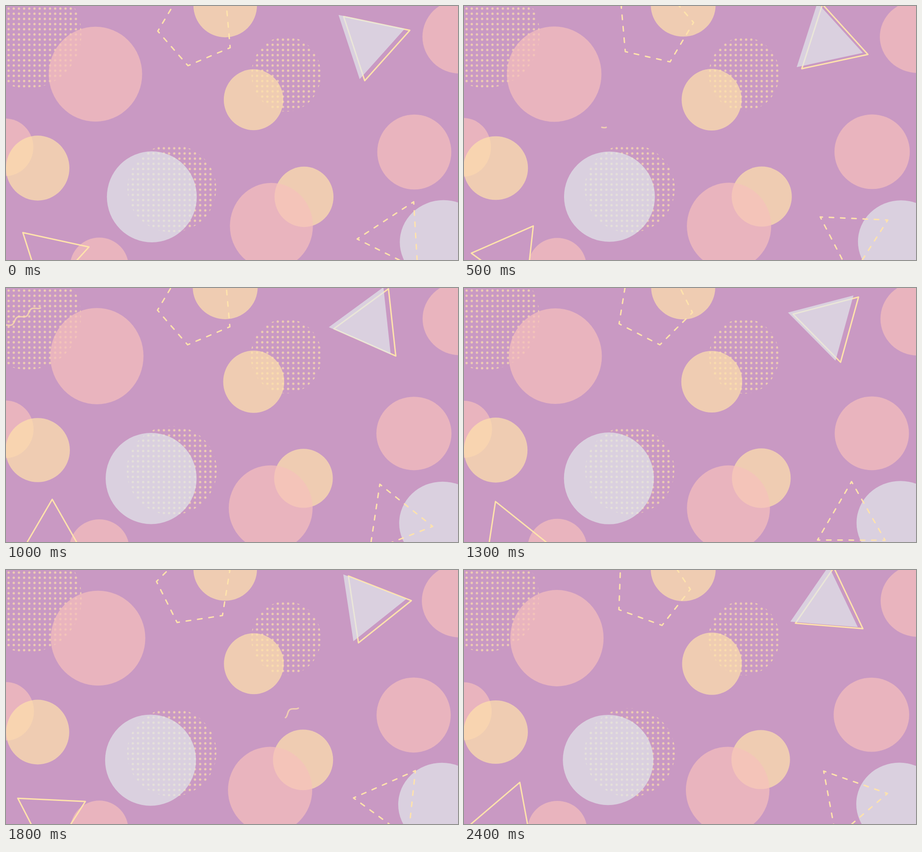
An HTML page that plays this animation: 998 px wide and 561 px high, repeating every 2500 ms.

```html
<!DOCTYPE html>
<html lang="en">
<head>
<meta charset="utf-8">
<title>Pastel shapes</title>
<style>
  html, body { margin: 0; width: 100%; height: 100%; overflow: hidden; background: #c999c3; }
  svg { display: block; width: 100vw; height: 100vh; }
</style>
</head>
<body>
<svg id="stage" viewBox="0 0 998 561" preserveAspectRatio="none">
  <defs>
    <pattern id="dots" width="11.43" height="11.43" patternUnits="userSpaceOnUse">
      <circle cx="5.71" cy="5.71" r="2.5" fill="#ffe3ac"/>
    </pattern>
  </defs>
</svg>
<script>
const LOOP = 2.5, STEP = 0.1;
const YELLOW = '#ffe3ac', PINK = '#f7c1bc', LAVENDER = '#e1e8eb', DOTS = 'url(#dots)';
const stage = document.getElementById('stage');
const updaters = [];

let seed = 7;
const random = () => (seed = seed * 16807 % 2147483647) / 2147483647;

function set(el, attrs) {
  for (const name in attrs) el.setAttribute(name, attrs[name]);
}

function add(tag, attrs) {
  const el = document.createElementNS('http://www.w3.org/2000/svg', tag);
  set(el, attrs);
  return stage.appendChild(el);
}

// Slow random swing of about a pixel.
function wobble() {
  const phase = random() * 2 * Math.PI, speed = 3 + 2 * random();
  return t => 0.9 * Math.sin(phase + speed * t);
}

// Ellipse that drifts by (dx, dy) over one loop while its radii wobble.
function blob(fill, cx, cy, rx, ry, dx = 0, dy = 0) {
  const el = add('ellipse', { fill, opacity: 0.7 });
  const wobbleX = wobble(), wobbleY = wobble();
  updaters.push(t => set(el, {
    cx: cx + dx * t / LOOP, cy: cy + dy * t / LOOP,
    rx: rx + wobbleX(t), ry: ry + wobbleY(t)
  }));
}

// Coordinate with a start, a velocity and a curvature.
const arc = (start, velocity = 0, bend = 0) => t => start + velocity * t + bend * t * t;

// Regular polygon turning at a constant speed, angles in degrees.
function spinner(sides, x, y, angle, speed, style) {
  const radius = 86.2;
  const el = add('polygon', style);
  updaters.push(t => {
    const points = Array.from({ length: sides }, (_, i) => {
      const a = (angle + speed * t + i * 360 / sides) * Math.PI / 180;
      return (x(t) + radius * Math.cos(a)).toFixed(2) + ',' + (y(t) + radius * Math.sin(a)).toFixed(2);
    });
    set(el, { points: points.join(' ') });
  });
  return el;
}

// Whole number of dashes per side, so that every corner is covered by one.
function dashedSpinner(sides, ...rest) {
  const el = spinner(sides, ...rest);
  const side = 2 * 86.2 * Math.sin(Math.PI / sides);
  const period = side / Math.round(side / 24), dash = period * 0.4;
  set(el, {
    'stroke-linecap': 'round', 'stroke-dashoffset': dash / 2,
    'stroke-dasharray': dash + ' ' + (period - dash)
  });
}

// Four waves that draw themselves on, then wipe off from the start.
function squiggle(start, x1, y1, x2, y2) {
  const el = add('path', {
    fill: 'none', stroke: YELLOW, opacity: 0.7, 'stroke-width': 3.2,
    'stroke-linecap': 'round', 'stroke-linejoin': 'round'
  });
  const dx = x2 - x1, dy = y2 - y1, length = Math.hypot(dx, dy);
  const clamp = u => Math.max(0, Math.min(1, u));
  const point = u => {
    const lift = 4.2 * (1 - Math.cos(u * 8 * Math.PI));
    return (x1 + dx * u + dy / length * lift).toFixed(2) + ' ' +
           (y1 + dy * u - dx / length * lift).toFixed(2);
  };
  updaters.push(t => {
    const head = clamp((t - start) / 0.265), tail = clamp((t - start - 0.265) / 0.25);
    const points = Array.from({ length: 81 }, (_, i) => point(tail + (head - tail) * i / 80));
    set(el, { d: head > tail ? 'M' + points.join('L') : '' });
  });
}

blob(DOTS, 47.5, 62, 119, 119);
blob(DOTS, 618.5, 150.5, 77.5, 82);
blob(DOTS, 366, 403, 99, 97.5);

squiggle(0, 177, 327, 314, 268);
squiggle(0.735, -49, 118, 76, 44);
squiggle(1.735, 617, 326, 733, 241);

blob(YELLOW, 484, -1.5, 71, 70);
blob(YELLOW, 546.5, 207, 66.5, 68, 1);
blob(YELLOW, 658, 421.5, 65.5, 66, -3, -3);

blob(PINK, 197.5, 150.5, 103.5, 105.5, 8);
blob(PINK, 1002, 68, 83, 80.5);
blob(PINK, 901.5, 322.5, 82.5, 82, -2, -3);
blob(PINK, -2, 312, 62, 64, 2);
blob(PINK, 586, 486, 92.5, 95, -4);
blob(PINK, 206, 576, 65, 64, 0, -3);
blob(YELLOW, 70, 358, 70.5, 71);

blob(LAVENDER, 322, 421.5, 100, 100.5, -4, -2);
blob(LAVENDER, 966, 521.5, 96, 92, -5, -5);

const line = { fill: 'none', stroke: YELLOW, 'stroke-width': 3, 'stroke-linejoin': 'round' };

spinner(3, arc(809.7), arc(80.6), -18.2, 72, line);
spinner(3, arc(798.5), arc(77.1), -18.2, 72, { fill: LAVENDER, opacity: 0.7 });
spinner(3, arc(101, 3, -2.4), arc(558.5, -7, 1.5), -17.7, -72, line);
dashedSpinner(3, arc(861.5, -4.7), arc(509.5, 7.2, -3), -63.4, 72, line);
dashedSpinner(5, arc(421, 1, -1.7), arc(47.8, -8.5, 2.1), 102.9, -72, line);

const began = performance.now();
function draw() {
  const elapsed = (performance.now() - began) / 1000 % LOOP;
  const t = Math.floor(elapsed / STEP + 1e-6) * STEP;
  updaters.forEach(update => update(t));
  requestAnimationFrame(draw);
}
draw();
</script>
</body>
</html>
```
